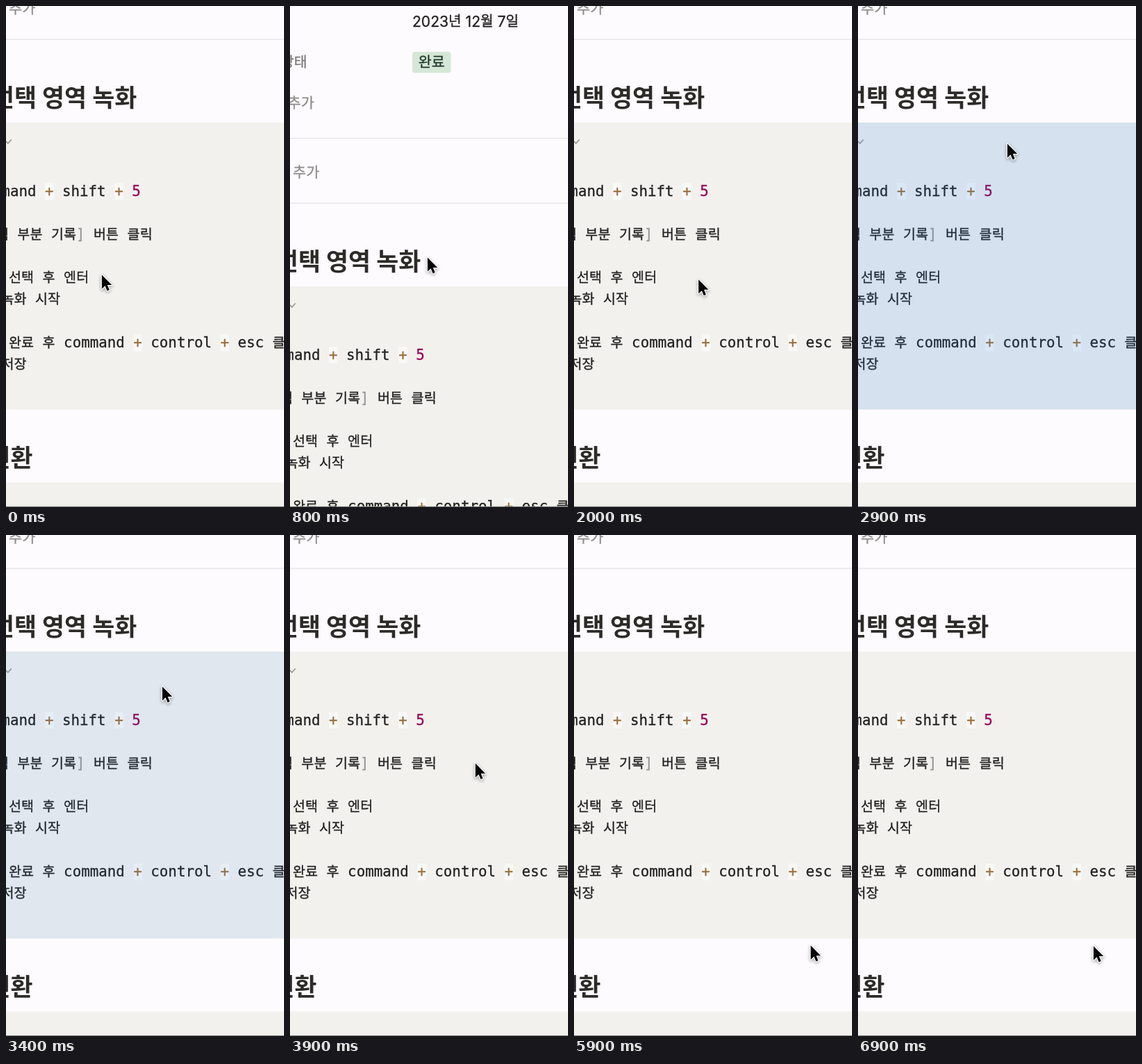
Recreate the animation shown at these times as an HTML page with a canvas. Size 400 px wide and 722 px high, loop 7 s.

```html
<!DOCTYPE html>
<html lang="ko">
<head>
<meta charset="utf-8">
<title>선택 영역 녹화</title>
<style>
  html, body { margin: 0; width: 100%; height: 100%; overflow: hidden; background: #fdfbfe; }
  canvas { display: block; width: 400px; height: 722px; }
</style>
</head>
<body>
<canvas id="stage"></canvas>
<script>
const W = 400, H = 722, LOOP = 7000, STEP = 100;
const canvas = document.getElementById('stage');
const ctx = canvas.getContext('2d');
const ratio = window.devicePixelRatio || 1;
canvas.width = W * ratio;
canvas.height = H * ratio;

const HANGUL = '"Noto Sans CJK KR", "Noto Sans CJK JP", "Noto Sans CJK", sans-serif';
const MONO = '20.8px "DejaVu Sans Mono", monospace';
const SANS = '21.1px Inter, sans-serif';
const INK = '#222120', GRAY = '#8e8c8a', OPERATOR = '#9a6e3a', NUMBER = '#990055', BRACKET = '#999';

// Keyframes: time, then values
const scrollKeys = [[300, 0], [800, 236], [1000, 236], [1500, 0]];
const cursorKeys = [
  [300, 137, 386], [800, 197, 361], [1050, 197, 361], [1500, 172, 430], [1800, 172, 430],
  [2600, 212, 192], [2800, 212, 192], [2900, 214, 197], [3400, 224, 217], [3600, 226, 222],
  [4400, 352, 556], [4600, 357, 560], [5000, 344, 565], [5200, 340, 590], [5700, 340, 590],
  [6500, 338, 591]
];
const highlightKeys = [[2299, 0], [2300, 1], [3250, 1], [3600, 0]];
const chevronKeys = [[5200, 1], [5600, 0]];

function sample(keys, t) {
  const next = keys.findIndex(k => k[0] > t);
  if (next === 0) return keys[0].slice(1);
  if (next < 0) return keys[keys.length - 1].slice(1);
  const a = keys[next - 1], b = keys[next];
  const p = (t - a[0]) / (b[0] - a[0]);
  const eased = p * p * (3 - 2 * p);
  return a.slice(1).map((v, i) => v + (b[i + 1] - v) * eased);
}

function rect(x, y, w, h, color) {
  ctx.fillStyle = color;
  ctx.fillRect(x, y, w, h);
}

// Draws Hangul and Latin runs in their own fonts; returns the end position.
function mixed(text, x, y, color, latin = MONO, size = 19.6) {
  ctx.fillStyle = ctx.strokeStyle = color;
  ctx.lineWidth = 0.3;
  for (const run of text.match(/[가-힣]+|[^가-힣]+/g)) {
    const korean = /[가-힣]/.test(run);
    const baseline = korean ? y - 0.8 : y;
    ctx.font = korean ? `${size}px ${HANGUL}` : latin;
    ctx.fillText(run, x, baseline);
    ctx.strokeText(run, x, baseline);
    x += ctx.measureText(run).width;
  }
  return x;
}

function codeLine(row, x, parts) {
  const y = 274 + row * 31.2;
  for (const [text, color = INK] of parts) {
    if (color === OPERATOR) rect(x, y - 19, 12.5, 24, 'rgba(255,255,255,.5)');
    x = mixed(text, x, y, color);
  }
}

function heading(words, y) {
  ctx.font = `bold 34.8px ${HANGUL}`;
  ctx.fillStyle = '#2d2b28';
  for (const [word, x] of words) ctx.fillText(word, x, y);
}

function properties() {
  mixed('2023년 12월 7일', 176, -206.3, INK, SANS, 20.2);
  mixed('상태', -13, -147, '#7d7b79', SANS, 20.5);
  ctx.fillStyle = '#d5e7d7';
  ctx.beginPath();
  ctx.roundRect(176, -170, 55.5, 30.5, 4);
  ctx.fill();
  mixed('완료', 184.8, -147, '#20392b', SANS, 20.6);
  mixed('추가', -3.5, -88.5, GRAY, SANS, 20.8);
  mixed('추가', 4, 12, GRAY, SANS, 20.8);
  rect(0, -46, W, 1.2, '#e3e1e3');
  rect(0, 47.5, W, 1.2, '#e3e1e3');
}

function codeBlock(highlight, chevron) {
  rect(0, 168, W, 413.5, '#f2f1ee');
  const plus = ['+', OPERATOR];
  codeLine(0, -44.2, [['command '], plus, [' shift '], plus, [' '], ['5', NUMBER]]);
  codeLine(2, -32.2, [['선택 부분 기록'], [']', BRACKET], [' 버튼 클릭']]);
  codeLine(4, 4, [['선택 후 엔터']]);
  codeLine(5, -6.5, [['녹화 시작']]);
  codeLine(7, 4, [['완료 후 command '], plus, [' control '], plus, [' esc 클릭']]);
  codeLine(8, -6.5, [['저장']]);

  ctx.strokeStyle = `rgba(150,148,145,${chevron})`;
  ctx.lineWidth = 1.6;
  ctx.beginPath();
  ctx.moveTo(-2, 193);
  ctx.lineTo(2.8, 198);
  ctx.lineTo(7.8, 192.5);
  ctx.stroke();

  rect(0, 168, W, 413.5, `rgba(35,125,230,${0.14 * highlight})`);
}

const arrow = new Path2D('M0 0V17L3.9 13.3L6.4 19.2L9 18.1L6.6 12.2H12Z');

function cursor(x, y) {
  ctx.save();
  ctx.translate(x + 0.9, y + 1.4);
  ctx.scale(1.2, 1.2);
  ctx.lineJoin = 'round';
  ctx.lineWidth = 1.9;
  ctx.strokeStyle = '#fff';
  ctx.shadowColor = 'rgba(0,0,0,.4)';
  ctx.shadowBlur = 4 * ratio;
  ctx.shadowOffsetY = 1.5 * ratio;
  ctx.stroke(arrow);
  ctx.shadowColor = 'transparent';
  ctx.fillStyle = '#050505';
  ctx.fill(arrow);
  ctx.restore();
}

function draw(t) {
  const [scroll] = sample(scrollKeys, t);
  ctx.setTransform(ratio, 0, 0, ratio, 0, 0);
  rect(0, 0, W, H, '#fdfbfe');
  ctx.save();
  ctx.translate(0, scroll);
  properties();
  heading([['선택', -20], ['영역', 52], ['녹화', 124.3]], 144.8);
  codeBlock(sample(highlightKeys, t)[0], sample(chevronKeys, t)[0]);
  heading([['전환', -25.5]], 663.8);
  rect(0, 686.5, W, 300, '#f2f1ee');
  ctx.restore();
  rect(0, H - 1, W, 1, '#858585');
  cursor(...sample(cursorKeys, t));
}

const start = performance.now();
function tick() {
  const t = (performance.now() - start) % LOOP;
  draw(Math.floor(t / STEP) * STEP);
  requestAnimationFrame(tick);
}
tick();
</script>
</body>
</html>
```
